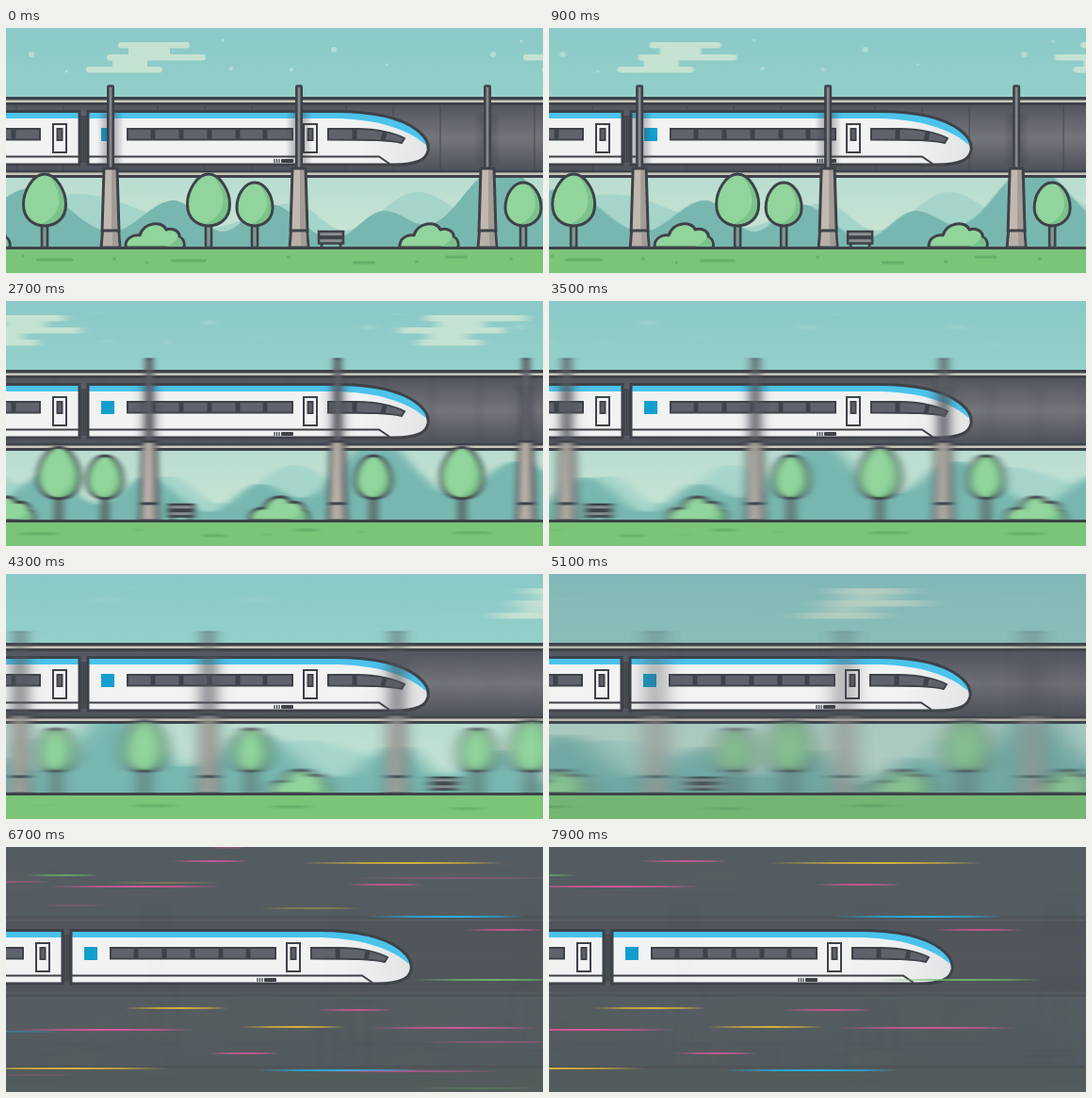
These frames come from a looping animation (570x260 px, 8 s). An HTML page:

```html
<!DOCTYPE html>
<html lang="en">
<head>
<meta charset="utf-8">
<title>Train</title>
<style>
  html, body { margin: 0; width: 100%; height: 100%; overflow: hidden; background: #51565c; }
  svg { display: block; width: 570px; height: 260px; }
</style>
</head>
<body>
<svg viewBox="0 0 570 260" xmlns="http://www.w3.org/2000/svg">
  <defs>
    <linearGradient id="sky" x2="0" y2="1">
      <stop offset="0" stop-color="#8ac9c8"/>
      <stop offset=".3" stop-color="#95d0c9"/>
      <stop offset=".62" stop-color="#b9ddd0"/>
      <stop offset="1" stop-color="#d3e9d8"/>
    </linearGradient>
    <linearGradient id="wallFill" x2="0" y2="1">
      <stop offset="0" stop-color="#53565f"/>
      <stop offset=".5" stop-color="#74757b"/>
      <stop offset="1" stop-color="#4f525b"/>
    </linearGradient>
    <linearGradient id="shade">
      <stop offset="0" stop-color="#3e4249" stop-opacity="0"/>
      <stop offset=".5" stop-color="#3e4249" stop-opacity=".5"/>
      <stop offset="1" stop-color="#3e4249" stop-opacity="0"/>
    </linearGradient>
    <linearGradient id="bodyFill">
      <stop offset=".8" stop-color="#f1f2f2"/>
      <stop offset="1" stop-color="#e3e4e5"/>
    </linearGradient>
    <filter id="farBlur" filterUnits="userSpaceOnUse" x="-100" y="0" width="770" height="260" color-interpolation-filters="sRGB"><feGaussianBlur stdDeviation="0 0"/></filter>
    <filter id="nearBlur" filterUnits="userSpaceOnUse" x="-100" y="0" width="770" height="260" color-interpolation-filters="sRGB"><feGaussianBlur stdDeviation="0 0"/></filter>
    <clipPath id="trainClip"><path d="M87 89H350C395 89 420 96 436 108C446 116 449 122 448 130C446 140 436 145 412 145H87Z"/></clipPath>
  </defs>

  <rect width="570" height="260" fill="url(#sky)"/>
  <g id="far" filter="url(#farBlur)"></g>
  <rect y="73" width="570" height="86" fill="#3e4249"/>
  <rect y="82" width="570" height="69" fill="url(#wallFill)"/>
  <g id="panels" filter="url(#nearBlur)"></g>
  <path d="M0 77.7H570M0 154.7H570" stroke="#cbc8bb" stroke-width="2.4"/>
  <g id="plants" filter="url(#nearBlur)"></g>
  <rect y="234" width="570" height="26" fill="#7bc578"/>
  <g id="spots" filter="url(#nearBlur)"></g>
  <path d="M0 233.5H570" stroke="#3e4249" stroke-width="3"/>
  <rect id="dusk" width="570" height="260" fill="#50555b"/>

  <g id="train" stroke="#3e4249" stroke-width="2" fill="none">
    <rect x="78" y="93" width="9" height="50" fill="#50535b" stroke="none"/>
    <path d="M80 93V143M82.5 93V143M85 93V143" stroke-width="1.3"/>
    <g stroke="none">
      <rect x="-30" y="89" width="108" height="56" fill="#f1f2f2"/>
      <rect x="-30" y="89" width="108" height="7" fill="#4bc3eb"/>
      <g clip-path="url(#trainClip)">
        <rect x="86" y="88" width="366" height="60" fill="#4bc3eb"/>
        <path d="M86 96H345C391 96 427 106 449 127V148H86Z" fill="url(#bodyFill)"/>
      </g>
    </g>
    <path d="M-30 136.5H78M87 136.5H396L407 144"/>
    <path d="M-30 88.5H78V145H-30M87 88.5H350C395 88.5 420 96 436 108C446 116 449 122 448 130C446 140 436 145 412 145H87Z" stroke-width="3"/>
    <g id="glass"></g>
    <path d="M342 107H372C395 107 414 112 423 117L420 122C405 119 390 118.5 342 118.5Z" fill="#5f636c"/>
    <path d="M370 107V119M402 110.5L400 119.5" stroke-width="5"/>
    <path d="M285 139V143M287.5 139V143M290 139V143" stroke-width="1.3"/>
    <rect x="292" y="139" width="13" height="4" rx="1" fill="#3e4249" stroke="none"/>
    <rect x="101" y="106" width="14" height="14" fill="#139fce" stroke="none"/>
  </g>
  <g id="pillars" filter="url(#nearBlur)"></g>
  <g id="streaks"></g>
</svg>

<script>
const LOOP = 8000, STEP = 100, INK = '#3e4249';
const NEAR_LOOP = 1375, FAR_LOOP = 1300, HILL_LOOP = 650, FAR_RATE = .83;
const $ = id => document.getElementById(id);
const movers = [];

function add(parent, tag, attrs) {
  const node = document.createElementNS('http://www.w3.org/2000/svg', tag);
  for (const key in attrs) node.setAttribute(key, attrs[key]);
  return parent.appendChild(node);
}
const path = (parent, d, fill, stroke = 'none', width = 3) =>
  add(parent, 'path', { d, fill, stroke, 'stroke-width': width, 'stroke-linejoin': 'round' });
const box = (parent, x, y, width, height, fill, more = {}) =>
  add(parent, 'rect', { x, y, width, height, fill, ...more });

// A group that scrolls left and wraps after `period`.
function mover(layer, x, period, rate = 1, min = -100) {
  const node = add($(layer), 'g', {});
  movers.push({ node, x, period, rate, min });
  return node;
}

function ridge(points, fill) {
  for (const start of [0, HILL_LOOP]) {
    const g = mover('far', start, HILL_LOOP * 2, FAR_RATE, -HILL_LOOP);
    const all = [...points, [points[0][0] + HILL_LOOP, points[0][1]]];
    let d = `M${all[0][0]} 240V${all[0][1]}`;
    for (let i = 1; i < all.length; i++) {
      const [x0, y0] = all[i - 1], [x1, y1] = all[i], reach = (x1 - x0) * .36;
      d += `C${x0 + reach} ${y0} ${x1 - reach} ${y1} ${x1} ${y1}`;
    }
    path(g, d + 'V240Z', fill);
  }
}

function cloud(x, bars, joints) {
  const g = mover('far', x, FAR_LOOP, FAR_RATE, -200);
  bars.forEach(([left, right], i) => box(g, left, 15 + 13 * i, right - left, 6.5, '#c5e2d2', { rx: 3.2 }));
  joints.forEach(([left, right], i) => box(g, left, 20 + 13 * i, right - left, 9, '#c5e2d2'));
}

function tree(x, half, top) {
  const g = mover('plants', x, NEAR_LOOP), low = 210, mid = top + (low - top) * .58;
  box(g, -3, 205, 6, 28, '#7f9a92', { stroke: INK, 'stroke-width': 2.6 });
  const egg = `M0 ${top}C${half * .55} ${top} ${half} ${mid - 14} ${half} ${mid}C${half} ${low - 7} ${half * .5} ${low} 0 ${low}`
    + `C${-half * .5} ${low} ${-half} ${low - 7} ${-half} ${mid}C${-half} ${mid - 14} ${-half * .55} ${top} 0 ${top}Z`;
  path(g, egg, '#91d49c');
  path(g, `M${half * .25} ${top + 3}C${half * .9} ${mid - 10} ${half * .9} ${low - 10} ${-half * .3} ${low - 1}`
    + `C${half * .5} ${low} ${half} ${low - 7} ${half} ${mid}C${half} ${mid - 14} ${half * .6} ${top + 5} ${half * .25} ${top + 3}Z`, '#7bc28b');
  path(g, egg, 'none', INK);
}

function bush(x) {
  const g = mover('plants', x, NEAR_LOOP);
  path(g, 'M-31 233C-32 223 -23 219 -16 220C-12 206 8 204 12 214C20 211 27 217 26 222C30 223 32 228 31 233Z', '#91d49c', INK);
  path(g, 'M12 232C20 229 23 225 24 222C29 223 30 228 29 232Z', '#7bc28b');
}

function bench(x) {
  const g = mover('plants', x, NEAR_LOOP);
  path(g, 'M-10 222V233M10 222V233', 'none', INK);
  for (const y of [216, 223]) box(g, -13, y, 26, 5.5, '#8b8f93', { stroke: INK, 'stroke-width': 2.5 });
}

function pillar(x) {
  const g = mover('pillars', x, 800);
  box(g, -14, 90, 28, 56, 'url(#shade)');
  box(g, -2.7, 61.5, 5.4, 90, '#84878d', { stroke: INK, 'stroke-width': 2.6, rx: 1 });
  path(g, 'M-7 149H7L9 216H-9Z', '#c1b9b0');
  path(g, 'M1 149H7L9 216H1Z', '#a39b96');
  path(g, 'M-7 149H7L9 216H-9Z', 'none', INK);
  path(g, 'M-8.5 215H8.5L10 233H-10Z', '#b8b0a8', INK);
  path(g, 'M2 217H7.5L8.5 231H2Z', '#a39b96');
}

function build() {
  ridge([[-30, 208], [75, 176], [215, 212], [305, 186], [360, 215], [437, 174], [510, 205], [560, 180]], '#a5d5ca');
  ridge([[-45, 205], [25, 170], [112, 216], [178, 183], [230, 216], [280, 187], [347, 224], [402, 194], [446, 209], [525, 147]], '#78b7b0');
  const cloudA = [[119, 195], [107, 212], [85, 166]], jointsA = [[130, 174], [113, 150]];
  cloud(0, cloudA, jointsA);
  cloud(0, [[577, 685], [549, 662], [569, 637]], [[590, 640], [580, 622]]);
  cloud(847, cloudA, jointsA);
  const stars = [[27, 28, 3], [64, 46, 1.5], [230, 13, 1.5], [239, 43, 2], [303, 44, 2], [348, 23, 3],
    [404, 39, 1.5], [517, 28, 3], [547, 14, 1.5], [370, 179, 3]];
  for (const [x, cy, r] of stars)
    add(mover('far', x, HILL_LOOP, FAR_RATE, -60), 'circle', { cy, r, fill: '#bfe1d5', opacity: .8 });

  for (let x = 11; x < 800; x += 50) box(mover('panels', x, 800), -.8, 82, 1.6, 69, '#454850', { opacity: .6 });
  [41, 215, 643, 1054, 1241].forEach(x => tree(x, 22.5, 155));
  [264, 549, 756, 996].forEach(x => tree(x, 19, 164));
  [-27, 158, 449, 808, 1173].forEach(bush);
  [345, 961].forEach(bench);
  [111, 311, 511, 711].forEach(pillar);
  const spots = [[52, 246, 40], [194, 247, 38], [380, 249, 24], [478, 243, 24], [653, 246, 38], [798, 247, 36],
    [985, 249, 28], [1140, 246, 36], [115, 245, 4], [150, 249, 3], [300, 243, 4], [436, 248, 4], [536, 245, 4], [18, 242, 3]];
  for (const [x, y, w] of spots) box(mover('spots', x, NEAR_LOOP), -w / 2, y - 1.5, w, 3, '#67b068', { rx: 1.5 });

  const glass = $('glass');
  const pane = (x, y, w, h) => box(glass, x, y, w, h, '#5f636c');
  pane(-20, 107, 56, 11.5);
  pane(129, 107, 175, 11.5);
  for (const x of [8, 156, 186, 216, 246, 275]) path(glass, `M${x} 107V118`, 'none', INK, 5);
  for (const x of [50, 316]) {
    box(glass, x, 102, 14, 30, '#f1f2f2');
    pane(x + 4.5, 107, 5, 12);
  }
}

// Each streak: left, right, y, colour, strength, and whether it dies away late.
const PINK = '#e0569f', GOLD = '#d9b13c', BLUE = '#24b4e6', LEAF = '#6fbf6b';
const streakSpecs = [
  [175, 258, 15, PINK, .8], [313, 528, 17, GOLD, 1], [22, 97, 30, LEAF, .7], [45, 228, 42, PINK, .9],
  [362, 442, 40, PINK, .8], [380, 552, 74, BLUE, 1], [488, 570, 88, PINK, .8], [430, 592, 141, LEAF, .9],
  [125, 236, 171, GOLD, 1], [328, 412, 173, PINK, .8], [5, 202, 194, PINK, 1], [248, 360, 191, GOLD, 1],
  [385, 565, 192, PINK, .9], [213, 290, 219, PINK, .8], [-50, 172, 235, GOLD, 1], [265, 440, 237, BLUE, 1],
  [360, 590, 33, PINK, .4, 1], [105, 228, 38, GOLD, .4, 1], [-50, 50, 37, PINK, .5, 1], [35, 108, 62, PINK, .3, 1],
  [268, 378, 65, GOLD, .5, 1], [-40, 60, 196, BLUE, .4, 1], [440, 590, 207, PINK, .5, 1], [325, 525, 238, PINK, .7, 1],
  [-20, 72, 242, PINK, .3, 1], [430, 565, 256, LEAF, .3, 1], [215, 255, .5, PINK, .5, 1]
];
const streaks = streakSpecs.map(([left, right, y, color, strength, dies], i) => {
  const grad = add($('streaks'), 'linearGradient', { id: 'streak' + i });
  [[0, 0], [.3, .75], [.55, 1], [.8, .65], [1, 0]].forEach(([offset, alpha]) =>
    add(grad, 'stop', { offset, 'stop-color': color, 'stop-opacity': alpha }));
  const node = box($('streaks'), left, y - 1, right - left, 2, `url(#streak${i})`);
  return { node, left, right, strength, dies };
});

const ramp = (t, a, b) => {
  const u = Math.min(1, Math.max(0, (t - a) / (b - a)));
  return u * u * (3 - 2 * u);
};

// Hermite curve through [time, value, speed] keys; returns value and speed.
function follow(keys, t) {
  const first = keys[0], last = keys[keys.length - 1];
  if (t <= first[0]) return [first[1], first[2]];
  if (t >= last[0]) return [last[1] + last[2] * (t - last[0]), last[2]];
  const i = keys.findIndex(key => key[0] > t);
  const [t0, x0, v0] = keys[i - 1], [t1, x1, v1] = keys[i];
  const h = t1 - t0, u = (t - t0) / h, w = 1 - u;
  const value = x0 * (1 + 2 * u) * w * w + v0 * h * u * w * w + x1 * u * u * (3 - 2 * u) - v1 * h * u * u * w;
  const speed = 6 * u * w * (x1 - x0) / h + v0 * w * (1 - 3 * u) + v1 * u * (3 * u - 2);
  return [value, speed];
}
const travelKeys = [[0, 0, 4], [1.6, 50, 70], [2.7, 159, 143], [4.3, 496, 320], [5.1, 798, 440], [6.3, 1480, 680]];
const driftKeys = [[4.7, 0, 0], [5.1, -1, -5], [6.7, -18, -4], [7.9, -20, 0]];

function draw(t) {
  const [travel, speed] = follow(travelKeys, t);
  const fade = ramp(t, 4.6, 6.6);
  for (const { node, x, period, rate, min } of movers) {
    const at = (((x - travel * rate - min) % period) + period) % period + min;
    node.setAttribute('transform', `translate(${at.toFixed(2)} 0)`);
  }
  $('nearBlur').firstChild.setAttribute('stdDeviation', `${(speed * .024).toFixed(2)} 0`);
  $('farBlur').firstChild.setAttribute('stdDeviation', `${(speed * .04).toFixed(2)} 0`);
  $('dusk').setAttribute('opacity', fade * .94);
  $('pillars').setAttribute('opacity', 1 - fade * .97);
  $('train').setAttribute('transform', `translate(${follow(driftKeys, t)[0].toFixed(2)} 0)`);

  const since = t - 6.7, rush = 120 * Math.max(0, 6.4 - t) ** 2, shown = ramp(t, 5.3, 6.5);
  for (const { node, left, right, strength, dies } of streaks) {
    const grow = 5 * since;
    node.setAttribute('x', left - 62 * since + rush - grow);
    node.setAttribute('width', Math.max(1, right - left + 2 * grow));
    node.setAttribute('opacity', shown * strength * (dies ? 1 - ramp(t, 6.3, 7.7) : 1));
  }
}

build();
const begin = performance.now();
function tick() {
  const ms = (performance.now() - begin) % LOOP;
  draw(Math.floor(ms / STEP) * STEP / 1000);
  requestAnimationFrame(tick);
}
tick();
</script>
</body>
</html>
```
